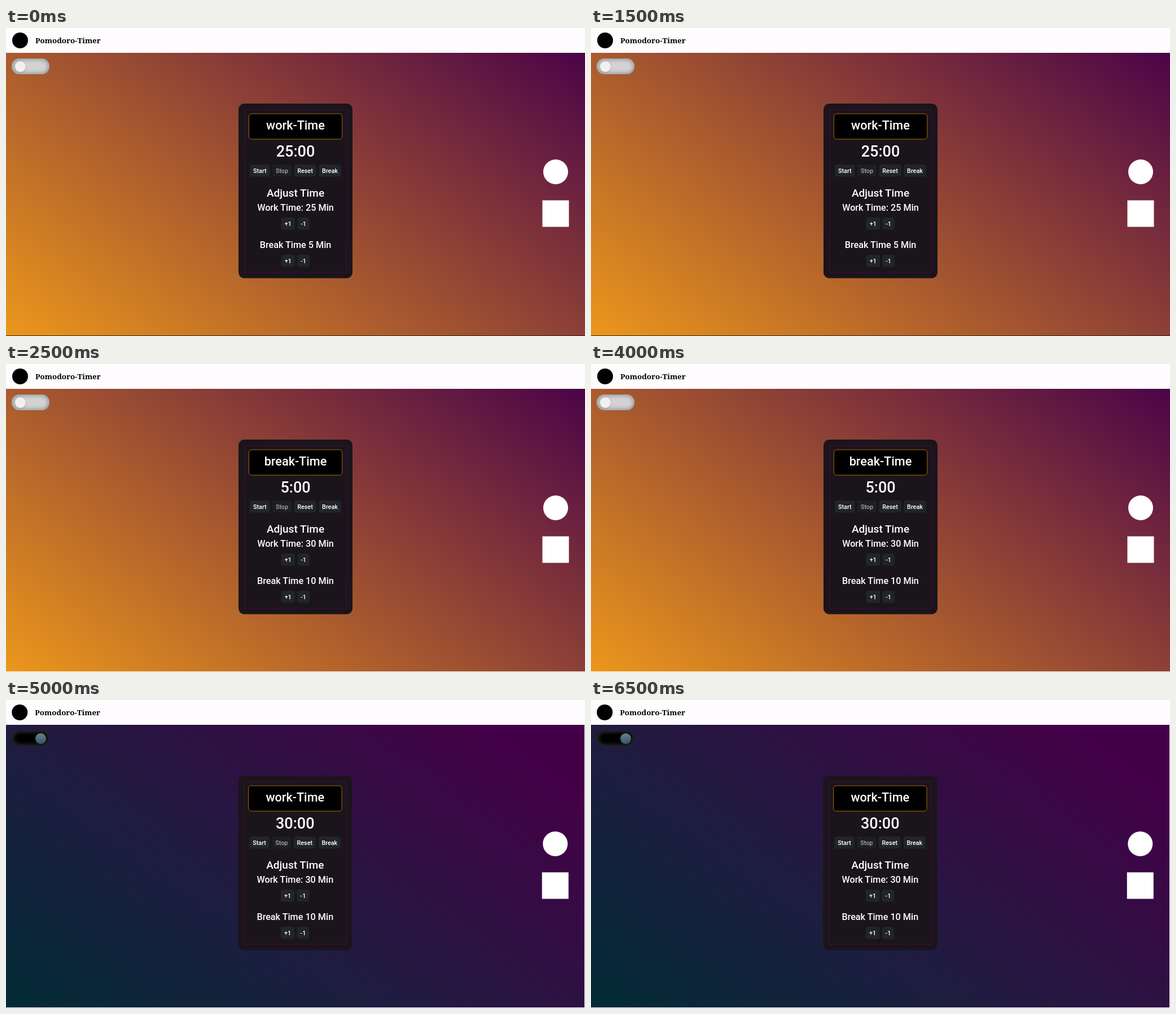
An HTML page for the animation above (7.5 s loop, 1026 by 546 pixels).

```html
<!DOCTYPE html>
<html lang="en">
<head>
<meta charset="utf-8">
<title>Pomodoro-Timer</title>
<style>
  html, body { margin: 0; width: 100%; height: 100%; overflow: hidden; }
  #stage { position: relative; width: 1026px; height: 546px; overflow: hidden; background: #fffcff; }
  #page { position: absolute; top: 44px; width: 1026px; height: 501px; }
  #stage.day #page { background: linear-gradient(35deg, #eb971c, #4b0448); }
  #stage.night #page { width: 1025px; background: linear-gradient(35deg, #022b36, #1f1c40 40%, #440047 90%); }
  svg { position: absolute; left: 0; top: 0; }
  text { font-family: Roboto, sans-serif; font-weight: 500; fill: #fff; text-anchor: middle; }
  text.brand { font: 600 13.4px "Noto Serif", serif; fill: #000; text-anchor: start; }
  #toggle { position: absolute; left: 10px; top: 54px; width: 67px; height: 28px; border-radius: 14px; }
  #knob { position: absolute; top: 5px; width: 19px; height: 19px; border-radius: 50%; }
  .day #toggle { background: #d3d3d3; box-shadow: inset 0 0 7px 2px #909090; }
  .day #knob { left: 6px; background: #f0f0f0; box-shadow: 0 1px 3px #999; }
  .night #toggle { background: #000; box-shadow: inset 0 0 7px 3px #2d2b2e; }
  .night #knob { left: 42px; background: linear-gradient(#6b7f8a, #31586a); }
</style>
</head>
<body>
<div id="stage" class="day">
  <div id="page"></div>
  <div id="toggle"><div id="knob"></div></div>
  <svg width="1026" height="546" viewBox="0 0 1026 546"><g id="view"></g></svg>
</div>
<script>
const stage = document.getElementById('stage');
const view = document.getElementById('view');
const HOLD = 2500;
const states = [
  { theme: 'day', mode: 'work-Time', clock: '25:00', work: 25, rest: 5, edge: '#3a2420' },
  { theme: 'day', mode: 'break-Time', clock: '5:00', work: 30, rest: 10, edge: '#fffcff' },
  { theme: 'night', mode: 'work-Time', clock: '30:00', work: 30, rest: 10, edge: '#fffcff' }
];

const rect = (x, y, w, h, r, fill, stroke = 'none') =>
  `<rect x="${x}" y="${y}" width="${w}" height="${h}" rx="${r}" fill="${fill}" stroke="${stroke}"/>`;
const label = (text, x, y, size, extra = '') =>
  `<text x="${x}" y="${y}" font-size="${size}" ${extra}>${text}</text>`;
const button = (text, x, y, w, off) =>
  rect(x, y, w, 21.5, 4, off ? '#1e1e23' : '#212529') +
  label(text, x + w / 2, y + 14.7, 10.8, off ? 'opacity=".62"' : '');
const stepper = y => button('+1', 487.5, y, 24.5) + button('-1', 516.3, y, 21.7);

function draw(s) {
  stage.className = s.theme;
  const shift = s.theme === 'night' ? -0.7 : 0;
  view.innerHTML =
    rect(0, 545, 1026, 1, 0, s.edge) +
    `<g transform="translate(${shift})">` +
    '<circle cx="25" cy="22" r="14"/>' +
    label('Pomodoro-Timer', 52, 27, 14, 'class="brand"') +
    rect(412, 134, 202, 309.5, 10, '#1a151a') +
    rect(422.5, 144.5, 181.5, 288.5, 0, 'none', '#4f0447') +
    rect(430.3, 152, 165.5, 45, 5, '#000', '#a8690f') +
    label(s.mode, 513, 179.5, 21.7) +
    label(s.clock, 513, 227.5, 27) +
    button('Start', 432, 242, 35.5) +
    button('Stop', 472, 242, 34, true) +
    button('Reset', 510.5, 242, 39) +
    button('Break', 554.5, 242, 39) +
    label('Adjust Time', 513, 299, 19) +
    label(`Work Time: ${s.work} Min`, 513, 324.2, 16.2) +
    stepper(336) +
    label(`Break Time ${s.rest} Min`, 513, 390, 16.2) +
    stepper(402) +
    '<circle cx="974" cy="255" r="22" fill="#fff"/>' +
    rect(950.5, 305.5, 47, 47, 0, '#fff') +
    '</g>';
}

let shown = -1;
function tick(now) {
  const i = Math.floor(now / HOLD) % states.length;
  if (i !== shown) draw(states[shown = i]);
  requestAnimationFrame(tick);
}
tick(performance.now());
</script>
</body>
</html>
```
